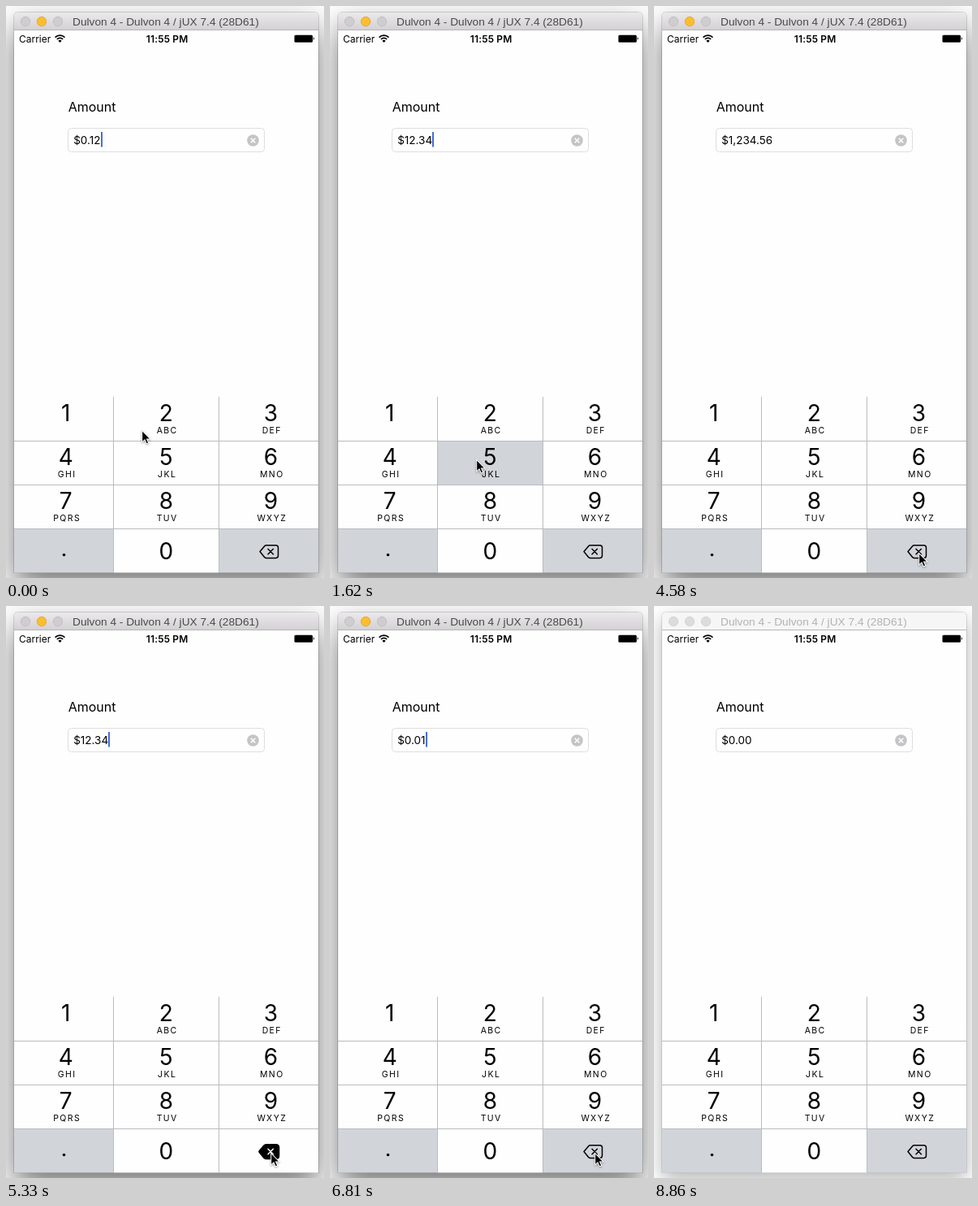
An HTML page for the animation above (8.96 s loop, 392x704 px).

```html
<!DOCTYPE html>
<html lang="en">
<head>
<meta charset="utf-8">
<title>Amount field</title>
<style>
  html, body { margin: 0; width: 392px; height: 704px; overflow: hidden; background: #fff; }
  #stage { position: relative; width: 392px; height: 704px; overflow: hidden; }
  #shadow {
    position: absolute; left: 10px; top: 8px; width: 375px; height: 689px;
    border-radius: 5px 5px 0 0;
    box-shadow: 0 0 0 1px rgba(0,0,0,.14), 0 18px 40px rgba(0,0,0,.55);
  }
  .idle #shadow { box-shadow: 0 0 0 1px rgba(0,0,0,.1), 0 8px 24px rgba(0,0,0,.3); }
  svg { position: absolute; left: 0; top: 0; display: block; }
  text { font-family: Inter, "Open Sans", sans-serif; fill: #000; white-space: pre; }
  #title { font: 13.7px "Liberation Sans", Arial, sans-serif; fill: #4a4a4a; }
  .idle #title { fill: #b2b2b2; }
  #bar { fill: url(#metal); }
  .idle #bar { fill: #f6f6f6; }
  .light { fill: #cfcdcf; stroke: #bbb9bb; stroke-width: .8; }
  .amber { fill: #fdbd2f; stroke: #dfa023; }
  .idle .light { fill: #dcdcdc; stroke: #cfcfcf; }
  .status { font-size: 12px; }
  .clock { font-weight: 600; letter-spacing: .12px; text-anchor: middle; }
  .digit { font-size: 28px; text-anchor: middle; }
  .letters { font-size: 10.5px; letter-spacing: 1.4px; text-anchor: middle; }
  .line { stroke: #b9bcc0; }
</style>
</head>
<body>
<div id="stage">
  <div id="shadow"></div>
  <svg width="392" height="704" viewBox="0 0 392 704">
    <defs>
      <linearGradient id="metal" x1="0" y1="0" x2="0" y2="1">
        <stop offset="0" stop-color="#ebe9eb"/>
        <stop offset="1" stop-color="#d2d0d2"/>
      </linearGradient>
    </defs>

    <path id="bar" d="M10 30V13a5 5 0 0 1 5-5H380a5 5 0 0 1 5 5V30Z"/>
    <path d="M10 29.5H385" stroke="#b8b6b8"/>
    <circle class="light" cx="24" cy="19" r="5.7"/>
    <circle class="light amber" cx="44" cy="19" r="5.7"/>
    <circle class="light" cx="64" cy="19" r="5.7"/>
    <text id="title" x="82" y="24">Dulvon 4 - Dulvon 4 / jUX 7.4 (28D61)</text>

    <rect x="10" y="30" width="375" height="667" fill="#fefefe"/>

    <text class="status" x="16" y="44.7">Carrier</text>
    <g fill="none" stroke="#000" stroke-width="1.8">
      <path d="M60.6 38.6a8.2 8.2 0 0 1 11.8 0"/>
      <path d="M62.9 41a5 5 0 0 1 7.2 0"/>
    </g>
    <path d="M64.4 42.7a3 3 0 0 1 4.2 0L66.5 45Z"/>
    <text class="status clock" x="198.6" y="44.7">11:55 PM</text>
    <rect x="355.5" y="35.7" width="22.5" height="9" rx="1.5"/>
    <path d="M378.8 38.3a2 2 0 0 1 0 3.6Z"/>

    <text x="76.7" y="130.2" font-size="16">Amount</text>
    <rect x="76.5" y="150.5" width="242" height="29" rx="4" fill="#fefefe" stroke="#dedede"/>
    <text id="value" x="83.2" y="169.7" font-size="13.5"></text>
    <rect id="caret" y="155" width="2" height="18.5" fill="#456ee0"/>
    <circle cx="304.5" cy="165.5" r="7.3" fill="#c5c5c8"/>
    <path d="M301.7 162.7l5.6 5.6m0 -5.6l-5.6 5.6" stroke="#fff" stroke-width="1.5"/>

    <g id="pad"></g>
    <g stroke-linejoin="round" stroke-linecap="round">
      <path id="tag" d="M313 671.5L318.500 664.900Q319.400 663.800 320.700 663.800H332.700Q335.500 663.800 335.500 666.600V676.600Q335.500 679.400 332.700 679.400H320.700Q319.400 679.400 318.500 678.300Z" stroke="#000"/>
      <path id="cross" d="M323 668.300l6.400 6.400m0 -6.400l-6.400 6.400" stroke-width="1.5"/>
    </g>

    <path id="mouse" d="M0 0V15.500L3.600 12.200L6 17.600L8.700 16.400L6.300 11.200H11Z"
      fill="#000" stroke="#fff" stroke-width="1.100" style="filter:drop-shadow(0 1px 1px rgba(0,0,0,.4))"/>
  </svg>
</div>
<script>
const LOOP = 8960, TICK = 147.8;   // the picture advances in even ticks
const GONE = 56, IDLE = 59;        // pointer leaves, window loses focus
const ERASE = 11;
const GREY = '#d1d5da', WHITE = '#fefefe';
const $ = id => document.getElementById(id);

function add(tag, attrs, label = '') {
  const el = document.createElementNS('http://www.w3.org/2000/svg', tag);
  for (const k in attrs) el.setAttribute(k, attrs[k]);
  el.textContent = label;
  $('pad').append(el);
  return el;
}

// Keypad: three columns, rows 54px apart
const edgeX = [10, 132.5, 262.5, 385], midX = [73.8, 197.3, 326.4];
const rowY = r => 481.5 + 54 * r;
const letters = ['', 'ABC', 'DEF', 'GHI', 'JKL', 'MNO', 'PQRS', 'TUV', 'WXYZ'];
const restFill = i => i === 9 || i === ERASE ? GREY : WHITE;

const keys = Array.from({ length: 12 }, (_, i) => {
  const c = i % 3;
  return add('rect', {
    x: edgeX[c], y: rowY(Math.floor(i / 3)), width: edgeX[c + 1] - edgeX[c], height: 54
  });
});
for (let r = 1; r < 4; r++) add('path', { class: 'line', d: `M10 ${rowY(r)}H385` });
for (const x of edgeX.slice(1, 3)) add('path', { class: 'line', d: `M${x} 481V697` });
letters.forEach((s, i) => {
  const x = midX[i % 3], y = rowY(Math.floor(i / 3));
  add('text', { class: 'digit', x, y: y + 29.5 }, i + 1);
  add('text', { class: 'letters', x: x + 1.4, y: y + 44.5 }, s);
});
add('text', { class: 'digit', x: midX[1], y: 680.5 }, 0);
add('circle', { cx: 71.5, cy: 675.5, r: 1.8 });

// Digits 3 to 6 act on release; erasing acts on touch, every third tick
const taps = [[3, 4], [8, 9], [11, 12], [18, 20]].map(([down, up], i) => ({
  down, up, key: i + 2, edit: up, apply: cents => cents * 10 + i + 3
}));
for (let i = 0; i < 6; i++) {
  const down = 33 + 3 * i, hold = i % 4 === 1 ? 2 : 1;
  taps.push({ down, up: down + hold, key: ERASE, edit: down, apply: cents => Math.floor(cents / 10) });
}

// Pointer glides: from tick, to tick, target
const glides = [
  [0, 3, 308, 512], [4, 8, 86, 560], [9, 11, 180, 558], [15, 18, 325, 566],
  [22, 23, 346, 631], [23, 26, 380, 677], [26, 30, 326, 673], [50, 53, 319, 677]
];
const ease = p => p * p * (3 - 2 * p);

function pointerAt(n) {
  let x = 167, y = 522;
  for (const [from, to, tx, ty] of glides) {
    const p = ease(Math.min(1, Math.max(0, (n - from) / (to - from))));
    x += (tx - x) * p;
    y += (ty - y) * p;
  }
  return [x, y];
}

const money = cents => '$' + (cents / 100).toLocaleString('en-US', { minimumFractionDigits: 2 });
const caretOn = age => age < 5 || (age - 5) % 6 > 2;

function draw(n) {
  let cents = 12, edited = 0, held = -1;
  for (const tap of taps) {
    if (n >= tap.edit) {
      cents = tap.apply(cents);
      edited = tap.edit;
    }
    if (n >= tap.down && n < tap.up) held = tap.key;
  }

  $('value').textContent = money(cents);
  $('caret').setAttribute('x', Math.round(83.4 + $('value').getComputedTextLength()));
  $('caret').style.opacity = +caretOn(n - edited);

  keys.forEach((key, i) => {
    const rest = restFill(i), other = rest === GREY ? WHITE : GREY;
    key.setAttribute('fill', i === held ? other : rest);
  });
  const full = held === ERASE;
  $('tag').setAttribute('fill', full ? '#000' : 'none');
  $('tag').setAttribute('stroke-width', full ? 3.6 : 1.5);
  $('cross').setAttribute('stroke', full ? '#fff' : '#000');

  const [x, y] = pointerAt(n);
  $('mouse').setAttribute('transform', `translate(${x + .7} ${y + .5}) scale(.93)`);
  $('mouse').style.opacity = +(n < GONE);
  $('stage').classList.toggle('idle', n >= IDLE);
}

const start = performance.now();
let last = -1;
function frame() {
  const n = Math.floor(((performance.now() - start) % LOOP + 8) / TICK);
  if (n !== last) draw(last = n);
  requestAnimationFrame(frame);
}
frame();
</script>
</body>
</html>
```
